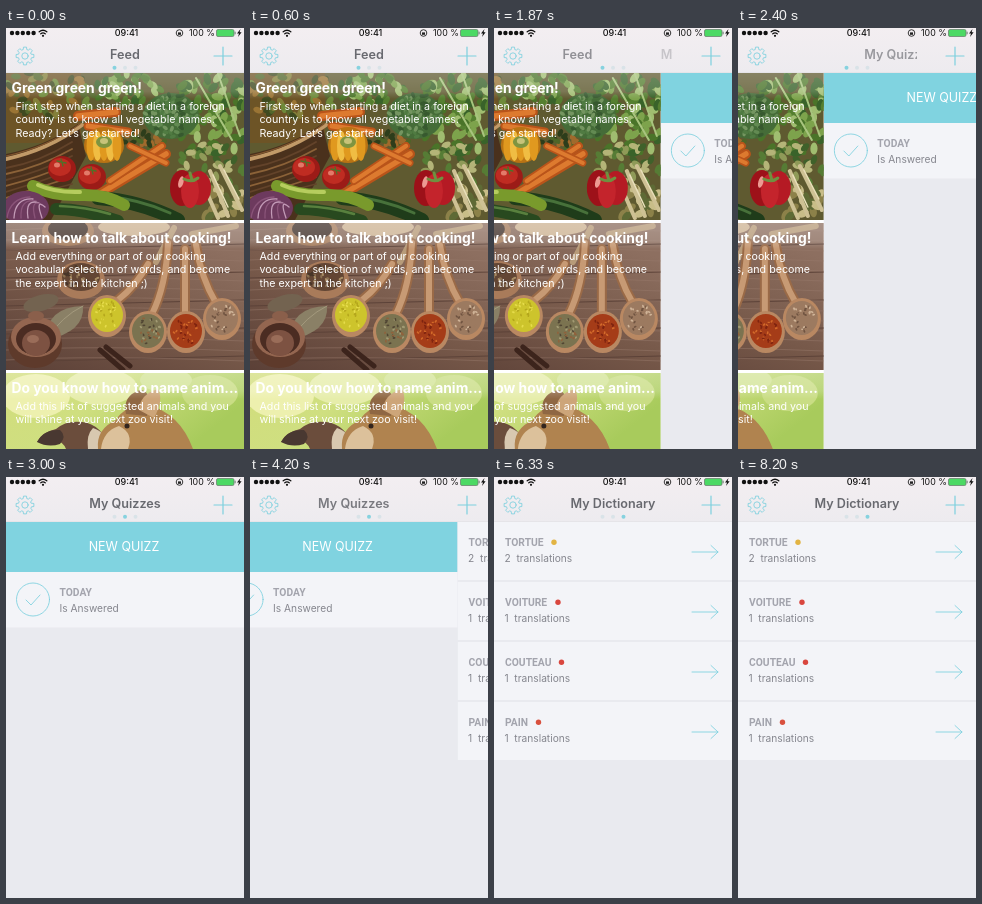
An HTML page that plays this animation: 238 px wide and 421 px high, repeating every 8.27 s.

```html
<!DOCTYPE html>
<html lang="en">
<head>
<meta charset="utf-8">
<title>Feed, quizzes, dictionary</title>
<style>
  html, body { margin: 0; width: 100%; height: 100%; overflow: hidden; background: #e9eaef; }
  #stage { display: block; width: 100vw; height: 100vh; }
  text { font-family: Inter, "Open Sans", sans-serif; white-space: pre; }
  .headline { font-size: 13.85px; font-weight: 700; fill: #fff; }
  .body { font-size: 10.7px; fill: #fff; }
  .label { font: 700 10.3px Roboto, sans-serif; fill: #a3a4ad; }
  .sub { font-size: 10.2px; fill: #85868e; }
  .title { font-size: 12.6px; font-weight: 600; fill: #68696f; text-anchor: middle; }
  .line { fill: none; stroke: #7dd0de; stroke-width: .85; stroke-linecap: round; stroke-linejoin: round; }
</style>
</head>
<body>
<svg id="stage" viewBox="0 0 238 421" xmlns="http://www.w3.org/2000/svg"></svg>
<script>
const W = 238, LOOP = 8270, CYAN = '#86d2df';

let seed = 7;
const random = () => (seed = (seed * 16807) % 2147483647) / 2147483647;
const range = (n, make) => Array.from({ length: n }, (_, i) => make(i)).join('');

const rect = (x, y, w, h, fill, more = '') =>
  `<rect x="${x}" y="${y}" width="${w}" height="${h}" fill="${fill}" ${more}/>`;
const oval = (x, y, rx, ry, fill, angle = 0) =>
  `<ellipse cx="${x}" cy="${y}" rx="${rx}" ry="${ry}" fill="${fill}" transform="rotate(${angle} ${x} ${y})"/>`;
const shape = (d, fill) => `<path d="${d}" fill="${fill}"/>`;
const stroke = (d, color, width) =>
  `<path d="${d}" fill="none" stroke="${color}" stroke-width="${width}" stroke-linecap="round"/>`;
const text = (x, y, kind, value) => `<text x="${x}" y="${y}" class="${kind}">${value}</text>`;

// Random specks inside an ellipse, for leaves and spices.
const specks = (n, x, y, rx, ry, size, colors) => range(n, i => {
  const a = random() * Math.PI * 2, r = Math.sqrt(random());
  return oval((x + Math.cos(a) * r * rx).toFixed(1), (y + Math.sin(a) * r * ry).toFixed(1),
    size, (size * 0.6).toFixed(1), colors[i % colors.length], Math.round(random() * 180));
});

const vegetables = () => {
  const leaves = ['#557f30', '#7da34c', '#39632a', '#a0bd70', '#4a7429'];
  const tomato = (x, y) => oval(x, y, 14, 13, '#9c1b17') + oval(x - 2, y - 2, 11, 9, '#bf2c22')
    + oval(x - 5, y - 4, 3, 2.5, '#e37a69')
    + stroke(`M${x - 5} ${y - 8}l9 2m-5 -4l2 7`, '#4c7328', 1.3);
  const carrot = (d, width) => stroke(d, '#b9541a', width) + stroke(d, '#dd7a2f', width * 0.55);
  return rect(0, 45, W, 147, '#5f5a30')
    + rect(0, 45, 75, 70, '#6d5426')
    + specks(50, 40, 66, 48, 24, 5, ['#53672b', '#84803a', '#3f4a20', '#9a7434', '#6e8a3a'])
    + shape('M0 126Q40 118 72 96L80 128 45 192H0Z', '#4a311c')
    + range(7, i => stroke(`M0 ${140 + i * 6}Q34 ${134 + i * 5} 66 ${114 + i * 7}`, i % 2 ? '#8b6238' : '#63432a', 1.8))
    + stroke('M0 131Q42 122 76 97', '#c19a68', 4) + stroke('M0 128Q42 119 74 96', '#83582f', 1.2)
    + specks(90, 206, 86, 40, 44, 6, leaves)
    + specks(40, 120, 60, 34, 16, 5, leaves)
    + specks(35, 205, 138, 33, 22, 5, ['#8f9a58', '#567c35', '#b4b478', '#3f612a'])
    + stroke('M190 50L226 112M212 46L234 108', '#a8c47e', 2)
    + carrot('M72 88L110 84', 10) + carrot('M82 98L122 104', 9)
    + specks(25, 135, 113, 24, 10, 4, ['#2d3d1b', '#4e6528', '#a06a2c'])
    + carrot('M90 168L160 126', 10) + carrot('M104 153L156 118', 8) + carrot('M124 118L160 135', 7)
    + oval(165, 88, 28, 23, '#456c38')
    + specks(80, 165, 87, 26, 22, 3, ['#507b42', '#749560', '#37592f', '#628a52'])
    + oval(98, 117, 20, 18, '#b97314') + range(5, i => oval(85 + i * 6.5, 118, 4.5, 15, i % 2 ? '#f0bd43' : '#e0991f'))
    + oval(98, 114, 8, 6, '#7f9440') + oval(98, 113, 4, 3, '#c8c379')
    + tomato(56, 141) + tomato(86, 149)
    + stroke('M92 170Q134 173 172 192', '#1f3c1a', 14) + stroke('M96 168Q134 171 164 185', '#47713a', 3)
    + stroke('M50 181Q78 181 112 193', '#28491f', 12) + stroke('M54 178Q80 179 104 186', '#58803e', 2.5)
    + stroke('M27 158Q48 168 74 167T118 177', '#799a2c', 12) + stroke('M32 157Q50 165 74 164', '#b6cd5e', 4)
    + specks(25, 214, 175, 25, 18, 6, ['#8c8149', '#c8bd88', '#5e6a35'])
    + stroke('M204 143L222 188M214 138L236 182M198 158L212 190', '#cec194', 4)
    + stroke('M207 147L222 179M218 142L233 171', '#e9dfba', 1.5)
    + oval(20, 180, 23, 17, '#6d3a5e')
    + range(6, i => stroke(`M${1 + i * 7} 190Q${4 + i * 5} 170 ${24 + i * 3} ${169 + i * 2}`, i % 2 ? '#c39bb7' : '#8a5479', 1.3))
    + oval(176, 160, 12, 18, '#9d1119') + oval(193, 160, 12, 17, '#b51a24') + oval(184, 163, 9, 17, '#c4242c')
    + oval(175, 154, 2.5, 6, '#ed9a92', 15)
    + stroke('M178 151Q186 155 192 150M186 152L184 145', '#6f9140', 3);
};

const spices = () => {
  const spoon = (handle, x, y, tones) => stroke(handle, '#9a6a47', 10) + stroke(handle, '#c79a74', 6)
    + oval(x, y, 19, 21, '#b98862') + oval(x, y - 1, 16, 17, tones[0]) + specks(45, x, y - 1, 13, 14, 1.5, tones);
  return rect(0, 195, W, 147, 'url(#wood)')
    + range(5, i => stroke(`M0 ${222 + i * 28}L238 ${216 + i * 28}`, '#5c4238', 1))
    + range(14, i => stroke(`M0 ${202 + i * 10}Q90 ${197 + i * 10} 238 ${203 + i * 10}`, '#96786a', 0.5))
    + oval(62, 203, 26, 15, '#a57c5c') + oval(62, 201, 20, 11, '#41312a')
    + oval(128, 199, 36, 9, '#cdb393') + stroke('M150 234L168 200M186 206L230 198', '#b79b79', 6)
    + oval(75, 252, 24, 19, '#a97b5a') + oval(75, 249, 19, 14, '#634634')
    + specks(35, 75, 249, 17, 12, 1.8, ['#8a7050', '#473529', '#a98d65'])
    + shape('M40 312Q40 279 77 278Q79 304 40 312Z', '#8a8066') + stroke('M40 312Q56 288 77 278', '#aaa083', 0.8)
    + oval(35, 275, 8, 18, '#736350', 75)
    + stroke('M94 322L117 342M100 319L124 338', '#3c241c', 5)
    + oval(29, 316, 27, 24, '#5e3a2b') + oval(30, 309, 25, 20, '#946650') + oval(30, 311, 20, 16, '#4b2c22')
    + oval(30, 315, 14, 13, '#7d5242') + oval(27, 311, 6, 4, '#9a6d59') + oval(30, 288, 8, 5, '#8a5f4b')
    + spoon('M112 272Q130 258 142 236', 101, 288, ['#cdc42c', '#e6dc4b', '#b4a71c'])
    + spoon('M146 286Q160 258 162 215', 142, 304, ['#7b7350', '#a29a73', '#514634', '#90623c'])
    + spoon('M179 286L179 221', 180, 304, ['#a53c18', '#d36a2a', '#7e230f'])
    + spoon('M210 275Q195 250 190 217', 216, 291, ['#9c7a60', '#cfb397', '#6f5340']);
};

const animals = () => rect(0, 345, W, 76, 'url(#meadow)')
  + oval(30, 368, 34, 22, '#edf0ae') + oval(95, 359, 36, 18, '#e6edaa')
  + oval(204, 365, 28, 18, '#c9dd84') + oval(160, 352, 26, 12, '#d3e497')
  + shape('M31 414Q36 404 50 401Q60 392 76 394Q96 396 104 421H60Q55 409 42 415Z', '#6b4d3c')
  + shape('M31 414Q38 401 54 402Q61 408 54 416Q42 420 31 414Z', '#493831')
  + shape('M82 421Q80 407 87 400Q100 404 105 421Z', '#d8c8b0')
  + shape('M92 421Q90 401 110 392Q118 378 140 376Q174 385 187 421Z', '#b0834f')
  + shape('M120 386Q116 368 134 362Q147 362 141 388Z', '#8f6743')
  + shape('M133 382Q134 366 152 361Q158 372 148 390Z', '#cda579')
  + shape('M95 421Q97 403 113 398Q128 405 122 421Z', '#dcc19b')
  + oval(121, 398, 2.5, 2.5, '#32251e');

const card = (y, photo, headline, lines) => {
  const h = Math.min(147, 421 - y);
  return `<svg y="${y}" width="${W}" height="${h}" viewBox="0 ${y} ${W} ${h}">${photo}${rect(0, y, W, 26, 'url(#glow)')}</svg>`
    + text(5.5, y + 19.5, 'headline', headline)
    + lines.map((line, i) => text(9.5, y + 37 + i * 13.4, 'body', line)).join('');
};

const feed = () => rect(0, 45, W, 376, '#fff')
  + card(45, vegetables(), 'Green green green!',
    ['First step when starting a diet in a foreign', 'country is to know all vegetable names.', 'Ready? Let’s get started!'])
  + card(195, spices(), 'Learn how to talk about cooking!',
    ['Add everything or part of our cooking', 'vocabular selection of words, and become', 'the expert in the kitchen ;)'])
  + card(345, animals(), 'Do you know how to name anim...',
    ['Add this list of suggested animals and you', 'will shine at your next zoo visit!']);

const quizzes = () => rect(0, 45, W, 376, '#e9eaef')
  + rect(0, 45, W, 50, '#80d3e0')
  + '<text x="118" y="73.5" font-size="12.5" fill="#fff" text-anchor="middle">NEW QUIZZ</text>'
  + rect(0, 95, W, 55.5, '#f3f4f8')
  + '<circle cx="27" cy="122.5" r="16.5" class="line"/><path d="M20 123l5 5 9-10" class="line"/>'
  + text(53.5, 118.5, 'label', 'TODAY') + text(53.5, 134.5, 'sub', 'Is Answered');

const words = [['TORTUE', 2, 60, '#e2b443'], ['VOITURE', 1, 64, '#d9463e'], ['COUTEAU', 1, 67.5, '#d9463e'], ['PAIN', 1, 44.5, '#d9503e']];
const dictionary = () => rect(0, 45, W, 376, '#e9eaef') + words.map(([word, count, dotX, color], i) => {
  const y = 45 + i * 60;
  return rect(0, y, W, 58, '#f3f4f8')
    + text(11, y + 24, 'label', word) + oval(dotX, y + 20.3, 2.7, 2.7, color)
    + text(10.5, y + 39.5, 'sub', `${count}  translations`)
    + `<path d="M198 ${y + 30}h26m-7-6.5l7 6.5-7 6.5" class="line"/>`;
}).join('');

const gear = () => {
  const points = [];
  for (let i = 0; i < 8; i++)
    for (const [turn, r] of [[-0.27, 6.7], [-0.17, 9], [0.17, 9], [0.27, 6.7]]) {
      const a = i * Math.PI / 4 + turn;
      points.push(`${(19 + r * Math.cos(a)).toFixed(2)},${(28 + r * Math.sin(a)).toFixed(2)}`);
    }
  return `<polygon points="${points.join(' ')}" class="line"/><circle cx="19" cy="28" r="3.2" class="line"/>`;
};

const status = () => range(5, i => oval(6 + i * 5.4, 5, 2.2, 2.2, '#111'))
  + stroke('M33.2 3.8Q37 .7 40.8 3.8M34.8 5.8Q37 4 39.2 5.8', '#111', 1.3) + oval(37, 7.8, 1.1, 1.1, '#111')
  + '<text x="120.5" y="8.3" font-size="9" font-weight="500" fill="#111" text-anchor="middle">09:41</text>'
  + '<circle cx="173.5" cy="5" r="3.3" fill="none" stroke="#222" stroke-width=".9"/>' + rect(172, 4.4, 3, 2.4, '#222')
  + '<text x="183" y="8.2" font-size="8.8" fill="#111">100 %</text>'
  + rect(210.5, 1.5, 17.5, 7, '#4cd964', 'rx="1.5" stroke="#66776a" stroke-width=".7"')
  + rect(228.6, 3.7, 1, 2.6, '#66776a') + shape('M234.5 1L231 5.6h2L232 9l3.6-4.8h-2z', '#111');

const titles = ['Feed', 'My Quizzes', 'My Dictionary'];
document.getElementById('stage').innerHTML = `
  <defs>
    <linearGradient id="meadow" x2="1" y2=".4">
      <stop stop-color="#d2dd7c"/><stop offset=".45" stop-color="#cfdf80"/><stop offset="1" stop-color="#a8cb5c"/>
    </linearGradient>
    <linearGradient id="wood" x1="0" y1="1" x2=".6" y2="0">
      <stop stop-color="#5b4037"/><stop offset=".5" stop-color="#765849"/><stop offset="1" stop-color="#8d6f60"/>
    </linearGradient>
    <linearGradient id="glow" x2="0" y2="1">
      <stop stop-color="#fff" stop-opacity=".25"/><stop offset=".7" stop-color="#fff" stop-opacity=".18"/><stop offset="1" stop-color="#fff" stop-opacity="0"/>
    </linearGradient>
    <linearGradient id="bar" x2="0" y2="1"><stop stop-color="#f3eef1"/><stop offset="1" stop-color="#edebef"/></linearGradient>
    <clipPath id="titleArea"><rect x="59" y="12" width="120" height="32"/></clipPath>
    <clipPath id="pageArea"><rect y="45" width="238" height="376"/></clipPath>
  </defs>
  ${rect(0, 0, W, 421, '#e9eaef')}
  ${[feed, quizzes, dictionary].map(page => `<g class="page"><g clip-path="url(#pageArea)">${page()}</g></g>`).join('')}
  ${rect(0, 0, W, 45, 'url(#bar)')}${rect(0, 44.5, W, 0.5, '#dcdce1')}
  ${status()}${gear()}
  <path d="M208 28h18M217 19v18" class="line" style="stroke-width:1.2"/>
  <g clip-path="url(#titleArea)">${titles.map(name => text(119, 30.5, 'title', name)).join('')}</g>
  ${range(3, i => `<circle class="dot" cx="${108.5 + i * 10.5}" cy="39.7" r="2"/>`)}`;

const pages = document.querySelectorAll('.page');
const names = document.querySelectorAll('.title');
const dots = document.querySelectorAll('.dot');

// Finger drag: [ms, px, px per ms], joined by cubic curves.
const drag = [[0, 0, 0], [470, 71, 0.152], [1000, 152, 0.153], [1600, W, 0]];
function swipe(t) {
  if (t <= 0) return 0;
  const i = drag.findIndex(([time]) => time >= t);
  if (i < 0) return W;
  const [t0, p0, v0] = drag[i - 1], [t1, p1, v1] = drag[i];
  const d = t1 - t0, u = (t - t0) / d, s = u * u * (3 - 2 * u);
  return p0 + (p1 - p0) * s + d * u * (1 - u) * (v0 * (1 - u) - v1 * u);
}

function draw(t) {
  const scroll = swipe(t - 1400) + swipe(t - 3946);
  const current = Math.floor(scroll / W + 0.01);
  pages.forEach((page, i) => {
    const x = i * W - scroll;
    page.setAttribute('transform', `translate(${x.toFixed(2)} 0)`);
    page.setAttribute('visibility', Math.abs(x) < W ? 'visible' : 'hidden');
    names[i].setAttribute('x', 119 + x / 2);
    names[i].setAttribute('opacity', Math.max(0, 1 - Math.abs(x) / W));
    dots[i].setAttribute('fill', i === current ? CYAN : '#d9e3e8');
  });
}

const start = performance.now();
function tick() {
  draw((performance.now() - start) % LOOP);
  requestAnimationFrame(tick);
}
tick();
</script>
</body>
</html>
```
